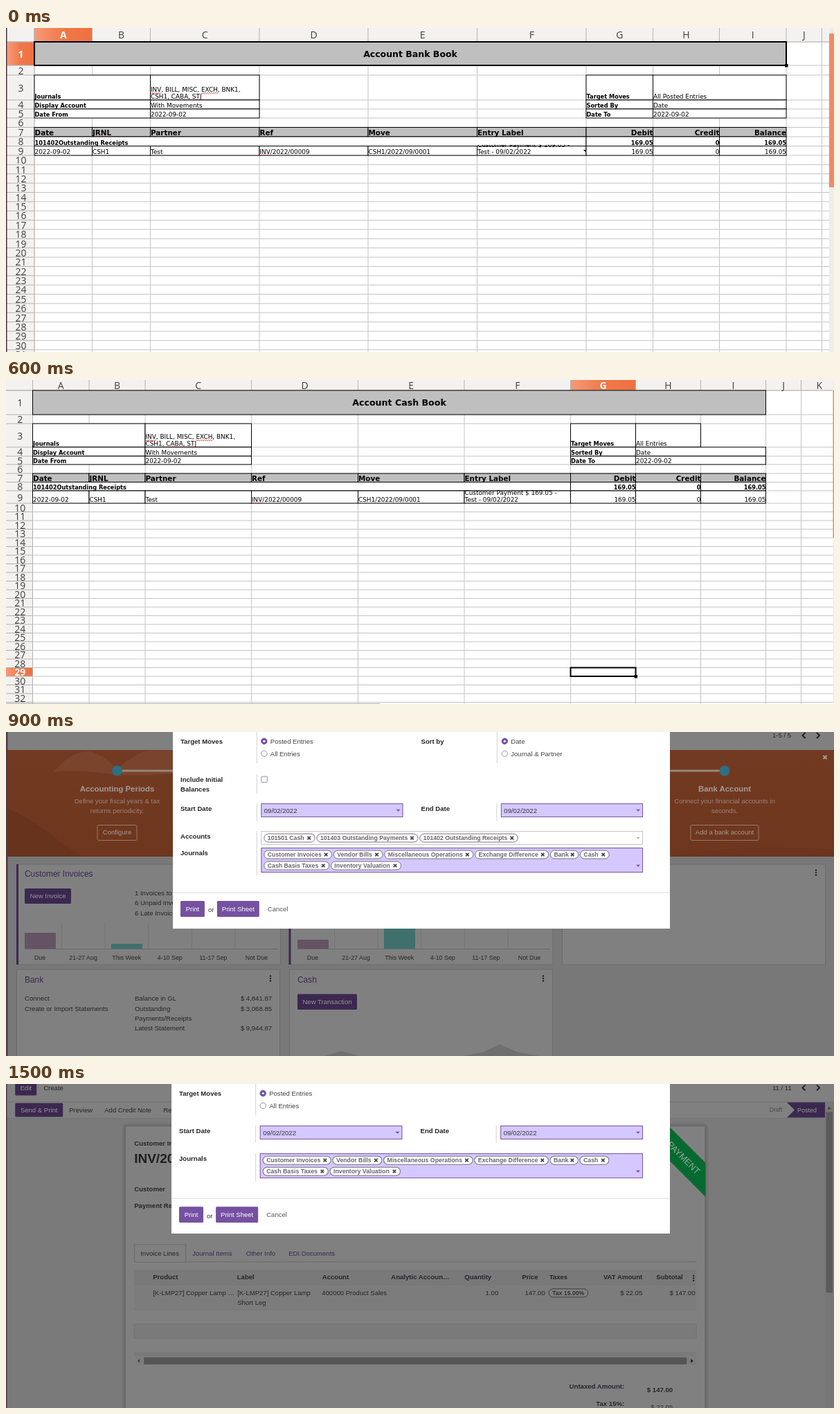
An HTML page for the animation above (1.8 s loop, 1196x468 px).

```html
<!DOCTYPE html>
<html lang="en">
<head>
<meta charset="utf-8">
<title>Accounting reports</title>
<style>
  html, body { margin: 0; width: 100%; height: 100%; overflow: hidden; background: #fff; }
  svg { display: block; }
  #stage { width: 1196px; height: 468px; }
  .scene { visibility: hidden; animation: show 1.8s step-end infinite; animation-delay: calc((var(--i) - 6) * .3s); }
  .sheet { font-family: "DejaVu Sans", sans-serif; }
  .head { font-family: "Open Sans", "Noto Sans", sans-serif; }
  .app { font-family: "Liberation Sans", Arial, sans-serif; }
  @keyframes show { 0% { visibility: visible; } 16.6666%, 100% { visibility: hidden; } }
</style>
</head>
<body>
<svg id="stage" viewBox="0 0 1196 468" xmlns="http://www.w3.org/2000/svg"></svg>
<script>
const PURPLE = '#7551a0', DIM = '#3b2850', INK = '#26262a', PALE = '#949494';
const pen = document.createElement('canvas').getContext('2d');

const rect = (x, y, x2, y2, fill, stroke = 'none', more = '') =>
  `<rect x="${x}" y="${y}" width="${x2 - x}" height="${y2 - y}" fill="${fill}" stroke="${stroke}" ${more}/>`;
const path = (d, stroke, w = 1, fill = 'none') =>
  `<path d="${d}" fill="${fill}" stroke="${stroke}" stroke-width="${w}"/>`;
const shape = (d, fill) => path(d, 'none', 0, fill);
const anchors = { l: 'start', m: 'middle', r: 'end' };

// y is the middle of the capitals
const text = (x, y, s, size = 9.55, fill = '#333', bold = 0, at = 'l') =>
  `<text x="${x}" y="${(y + size * .36).toFixed(2)}" font-size="${size}" fill="${fill}" text-anchor="${anchors[at]}"` +
  `${bold ? ' font-weight="700"' : ''}>${s}</text>`;
const bold = (x, y, s, fill = INK, at = 'l', size = 9.6) => text(x, y, s, size, fill, 1, at);

/* ---------- spreadsheets ---------- */

function squiggles(line, x, y, size, isBold) {
  pen.font = `${isBold ? 'bold ' : ''}${size}px "DejaVu Sans", sans-serif`;
  let out = '';
  for (const m of line.matchAll(/\b(INV|EXCH|CABA|STJ|JRNL)\b/g)) {
    const from = x + pen.measureText(line.slice(0, m.index)).width;
    const n = Math.round(pen.measureText(m[0]).width / 3);
    out += path(`M${from} ${y + 1.2}` + 'l1.5 1.2l1.5 -1.2'.repeat(n), '#e02020', .8);
  }
  return out;
}

function sheet({ xs, rows, step, right, sel, title, titleSize, body, edge = 0, scroll }) {
  const ys = [...rows];
  while (ys.at(-1) < 468) ys.push(ys.at(-1) + step);
  const left = xs[0], top = ys[0];

  const cell = (a, b, r, s = '', o = {}) => {
    const x = xs[a], x2 = xs[b], y = ys[r - 1], y2 = ys[r];
    const size = o.size || (o.bold ? 8.25 : 8.9);
    const lines = s.split('\n');
    const clipY = y - 2, h = y2 - clipY;
    const words = lines.map((line, i) => {
      const base = h - 2 - (lines.length - 1 - i) * 9.7;
      const tx = o.right ? x2 - x : .5;
      return text(tx, base - size * .36, line, size, '#000', o.bold, o.right ? 'r' : 'l') +
        (o.right ? '' : squiggles(line, tx, base, size, o.bold));
    }).join('');
    const mark = o.over ? shape(`M${x2 - 4} ${y2 - 8}h3v3z`, '#000') : '';
    return rect(x, y, x2, y2, o.fill || '#fff', '#000') +
      `<svg x="${x}" y="${clipY}" width="${x2 - x}" height="${h}">${words}</svg>${mark}`;
  };
  const row = (r, vals, o = {}, over) => vals.map((v, i) =>
    cell(i, i + 1, r, v, { ...o, right: i > 5, over: over && i === 5 })).join('');
  const total = (r, label, vals) => cell(0, 6, r, label, { bold: 1 }) +
    vals.map((v, i) => cell(6 + i, 7 + i, r, v, { bold: 1, right: 1 })).join('');
  const info = (r, label, value, c = 0, end = c ? 9 : 3) =>
    cell(c, c ? 7 : 2, r, label, { bold: 1 }) + cell(c ? 7 : 2, end, r, value);
  const titles = r => row(r, ['Date', 'JRNL', 'Partner', 'Ref', 'Move', 'Entry Label', 'Debit', 'Credit', 'Balance'],
    { bold: 1, size: 10.4, fill: '#bfbfbf' });

  let g = rect(0, 0, 1196, 468, '#fff');
  g += path(ys.map(y => `M${left} ${y}H${right}`).join('') + xs.map(x => `M${x} ${top}V468`).join(''), '#c4c4c4');

  let head = rect(0, 0, right, top, '#f4f2f1') + rect(0, 0, left, 468, '#f4f2f1');
  const [c1, c2, sr] = sel;
  head += rect(xs[c1], 0, xs[c1 + 1], top, 'url(#hot)') + rect(edge, ys[sr - 1], left, ys[sr], 'url(#hot)');
  head += path(xs.map(x => `M${x} 0V${top}`).join('') + ys.map(y => `M0 ${y}H${left}`).join('') +
    `M${left} 0V468M0 ${top}H${right}`, '#b5b1ae');
  for (let i = 0; i < xs.length - 1; i++) {
    const on = i === c1;
    head += text((xs[i] + xs[i + 1]) / 2, top / 2 + .3, String.fromCharCode(65 + i), 14, on ? '#fff' : '#3d3d3d', on, 'm');
  }
  for (let r = 1; r < ys.length; r++) {
    const on = r === sr;
    head += text(left / 2 + 1, (ys[r - 1] + ys[r]) / 2 + .5, r, 14, on ? '#fff' : '#3d3d3d', on, 'm');
  }
  g += `<g class="head">${head}</g>`;

  g += rect(left, ys[0], xs[9], ys[1], '#bfbfbf', '#000') +
    text((left + xs[9]) / 2, (ys[0] + ys[1]) / 2, title, titleSize, '#000', 1, 'm');
  g += body({ cell, row, total, info, titles });
  g += rect(xs[c1], ys[sr - 1], xs[c2], ys[sr], 'none', '#000', 'stroke-width="2"') +
    rect(xs[c2] - 2, ys[sr] - 2, xs[c2] + 2.5, ys[sr] + 2.5, '#000');
  g += rect(right, 0, 1196, 468, '#efecea') + rect(right, scroll[0], 1196, scroll[1], '#f08a65');
  return `<g class="sheet">${g}${rect(0, 0, edge, 468, '#45343a')}</g>`;
}

const journals = 'INV, BILL, MISC, EXCH, BNK1,\nCSH1, CABA, STJ';
const day = '2022-09-02', bill = 'INV/2022/00009', move = 'CSH1/2022/09/0001';
const paid = 'Customer Payment $ 169.05 -\nTest - 09/02/2022';

const bookBody = (target, targetEnd, over) => s =>
  s.info(3, 'Journals', journals) + s.info(4, 'Display Account', 'With Movements') + s.info(5, 'Date From', day) +
  s.info(3, 'Target Moves', target, 6, targetEnd) + s.info(4, 'Sorted By', 'Date', 6) + s.info(5, 'Date To', day, 6) +
  s.titles(7) + s.total(8, '101402Outstanding Receipts', ['169.05', '0', '169.05']) +
  s.row(9, [day, 'CSH1', 'Test', bill, move, paid, '169.05', '0', '169.05'], {}, over);

const bankBook = sheet({
  xs: [41, 124.5, 208.5, 366, 523, 680.5, 838, 934.5, 1030.5, 1127, 1178.5],
  rows: [20, 54, 68, 104, 117, 130, 143.5, 157, 170.5, 184], step: 13.37, right: 1189,
  sel: [0, 9, 1], title: 'Account Bank Book', titleSize: 12.5, edge: 1.5, scroll: [8, 230],
  body: bookBody('All Posted Entries', 9, true)
});

const cashBook = sheet({
  xs: [38.5, 120, 201, 354.5, 508.5, 662, 815.5, 909.5, 1003.5, 1097.5, 1148.5, 1201],
  rows: [15, 50, 63, 97, 110, 122, 135, 147.5, 160, 178], step: 12.5, right: 1194.5,
  sel: [6, 7, 29], title: 'Account Cash Book', titleSize: 12.6, scroll: [15, 228],
  body: bookBody('All Entries', 8, false)
}) + rect(0, 467, 540, 468, '#b5b1ae');

const dayBook = sheet({
  xs: [40, 118.5, 196.5, 343, 489, 635.5, 782, 871.5, 961.5, 1051, 1100, 1149.5, 1198],
  rows: [20, 53, 66, 99, 111.5, 124, 136.5, 149, 161.5, 186, 198, 210, 222.5, 235], step: 12.42, right: 1191,
  sel: [1, 2, 29], title: 'Account Day Book', titleSize: 11.5, edge: 1, scroll: [8, 230],
  body: s =>
    s.info(3, 'Journals', journals) + s.info(5, 'Date From', day) +
    s.info(3, 'Target Moves', 'All Posted Entries', 6) + s.info(5, 'Date To', day, 6) +
    s.titles(7) + s.total(8, day, ['338.1', '338.1', '0']) +
    s.row(9, [day, 'INV', 'Test', '', bill, '[K-LMP27] Copper Lamp Short\nLeg', '0', '147', '-147']) +
    s.row(10, [day, 'INV', 'Test', '', bill, 'Tax 15.00%', '0', '22.05', '-22.05']) +
    s.row(11, [day, 'INV', 'Test', '', bill, bill, '169.05', '0', '169.05']) +
    s.row(12, [day, 'CSH1', 'Test', bill, move, paid, '169.05', '0', '169.05'], {}, true) +
    s.row(13, [day, 'CSH1', 'Test', bill, move, paid, '0', '169.05', '-169.05'], {}, true)
});

/* ---------- app screens ---------- */

const button = (x, y, x2, y2, s, fill = DIM, ink = PALE) =>
  rect(x, y, x2, y2, fill, 'none', 'rx="1.5"') + text((x + x2) / 2, (y + y2) / 2, s, 9.55, ink, 0, 'm');
const dots = (x, y) => [-3.5, 0, 3.5].map(d => `<circle cx="${x}" cy="${y + d}" r="1.2" fill="#222"/>`).join('');
const cross = (x, y, r, ink, w) => path(`M${x - r} ${y - r}l${2 * r} ${2 * r}M${x + r} ${y - r}l${-2 * r} ${2 * r}`, ink, w);
const arrows = y => path(`M1154.5 ${y - 4}l-4 4l4 4M1171 ${y - 4}l4 4l-4 4`, '#1c1c1c', 1.8);
const caret = (x, y, ink = PURPLE) => shape(`M${x - 3} ${y - 1.3}h6l-3 3z`, ink);

// Each tag is [label, right edge]
function tags(list, y) {
  let x = 372;
  return list.map(([s, end]) => {
    const g = rect(x, y - 6, end, y + 6, '#fff', '#77727c', 'rx="6"') +
      bold(x + 5, y, s, '#6a6670', 'l', 8.75) + cross(end - 8.5, y, 2.2, '#4a4650', 1.8);
    x = end + 2.7;
    return g;
  }).join('');
}

const radio = (x, y, s, on) =>
  `<circle cx="${x}" cy="${y}" r="4.2" fill="${on ? PURPLE : '#fff'}" stroke="${on ? PURPLE : '#999'}"/>` +
  (on ? `<circle cx="${x}" cy="${y}" r="1.6" fill="#fff"/>` : '') + text(x + 9, y, s, 9.55, '#444');
const rule = (x, y, y2) => path(`M${x} ${y}V${y2}`, '#d2d2d2');

// The dialog keeps its right edge at 959 and zooms a little with its left edge
function modal({ left, y, bottom, account }) {
  const full = !!account, d = full ? 0 : -43.5, j = full ? 0 : -67.5;
  const zoom = (959 - left) / 719;
  const date = (lx, fx, s) => bold(lx, 111 + d, s) + rule(fx - 6.5, 104 + d, 129 + d) +
    rect(fx, 104.5 + d, fx + 204.5, 123.5 + d, '#d5c8ff', PURPLE) +
    text(fx + 4, 114 + d, '09/02/2022') + caret(fx + 198, 114 + d);

  let g = bold(251, 14, 'Target Moves') + rule(361.5, 0, 46) +
    radio(372, 14, 'Posted Entries', 1) + radio(372, 32, 'All Entries');
  if (full) {
    g += bold(599, 14, 'Sort by') + rule(709, 0, 46) + radio(720, 14, 'Date', 1) + radio(720, 32, 'Journal &amp; Partner');
    g += bold(251, 69, 'Include Initial') + bold(251, 83, 'Balances') + rule(361.5, 62, 90) +
      rect(368, 65, 376.5, 73.5, '#fff', '#8d8aa0', 'rx="1"');
    g += bold(251, 151, 'Accounts') + rect(368, 144.5, 919.5, 163.5, '#fff', '#c0c0c0') + caret(913, 154, '#b5b5b5') +
      tags([[account, 445.5], ['101403 Outstanding Payments', 594.5], ['101402 Outstanding Receipts', 739]], 154);
  }
  g += date(251, 368, 'Start Date') + date(599, 715, 'End Date');
  g += bold(251, 175 + j, 'Journals') + rule(361.5, (full ? 144 : 168) + j, 208 + j) +
    rect(368, 168.5 + j, 919.5, 203.5 + j, '#d5c8ff', PURPLE) + caret(913, 194 + j) +
    tags([['Customer Invoices', 470], ['Vendor Bills', 543.5], ['Miscellaneous Operations', 674.5],
      ['Exchange Difference', 783.5], ['Bank', 826.5], ['Cash', 871]], 178 + j) +
    tags([['Cash Basis Taxes', 466], ['Inventory Valuation', 570]], 194 + j);
  g += path(`M240 ${233 + j}H959`, '#dcdcdc') +
    button(251, 245 + j, 286, 268 + j, 'Print', PURPLE, '#fff') + text(291, 258 + j, 'or') +
    button(304, 245 + j, 365, 268 + j, 'Print Sheet', PURPLE, '#fff') + text(377, 256.5 + j, 'Cancel', 9.55, '#555');
  return rect(left, 0, 959, bottom, '#fff') +
    `<g transform="translate(${959 - 959 * zoom} ${y}) scale(${zoom})">${g}</g>`;
}

function invoice(dx, dy) {
  const line = '#696969', item = '[K-LMP27] Copper Lamp';
  let g = button(14, -5, 45, 17, 'Edit') + text(55, 6, 'Create', 9.55, INK);
  g += path('M0 26.5H1196M0 50.5H1183', '#747474');
  g += button(14, 28, 83, 48, 'Send &amp; Print') + text(92, 38, 'Preview', 9.55, INK) +
    text(143, 38, 'Add Credit Note', 9.55, INK) + text(228, 38, 'Reset', 9.55, INK);
  g += [10, 6, 3].map(w => rect(173.5, 62, 1010.5, 480, 'none', '#000', `stroke-width="${w}" opacity=".05" rx="2"`)).join('');
  g += rect(173.5, 61.5, 1010.5, 480, '#808080', '#6b6b6b');
  g += bold(186, 86.5, 'Customer Invoice') + bold(186, 108, 'INV/2022/00009', '#1f1f22', 'l', 19) +
    bold(186, 152, 'Customer') + bold(186, 176.5, 'Payment Reference');

  g += rect(186.5, 232.5, 260.5, 258, '#808080', line) + path('M260 257.5H998', line) + text(195, 245, 'Invoice Lines', 9.55, INK);
  [[270, 'Journal Items'], [347.5, 'Other Info'], [409, 'EDI Documents']].forEach(([x, s]) => g += text(x, 245, s, 9.55, DIM));

  g += rect(186, 269, 998, 290, '#797979') + rect(186, 290, 998, 326, '#7c7c7c') + path('M186 290.5H998M186 326.5H998', '#737373');
  [[213, 'Product'], [334.5, 'Label'], [457.5, 'Account'], [557, 'Analytic Accoun…'], [785.5, 'Taxes']]
    .forEach(([x, s]) => g += bold(x, 279.5, s));
  [[702, 'Quantity'], [769.5, 'Price'], [920, 'VAT Amount'], [978.5, 'Subtotal']]
    .forEach(([x, s]) => g += bold(x, 279.5, s, INK, 'r'));
  g += dots(994, 281);
  [[213, 302, item + ' …'], [335, 302, item], [335, 316, 'Short Leg'], [457, 302, '400000 Product Sales']]
    .forEach(([x, y, s]) => g += text(x, y, s, 9.55, INK));
  [[712, '1.00'], [779.5, '147.00'], [920, '$ 22.05'], [996.5, '$ 147.00']]
    .forEach(([x, s]) => g += text(x, 302, s, 9.55, INK, 0, 'r'));
  g += rect(785, 296.5, 841.5, 308.5, '#808080', '#3b3b3b', 'rx="6"') + bold(813, 302.5, 'Tax 15.00%', '#303034', 'm', 8.7);

  g += rect(186, 347, 998, 368, '#7a7a7a', '#747474') + rect(186, 388, 998, 394, '#797979');
  g += rect(189, 395, 998, 406, '#7c7c7c') + rect(200, 395.5, 984, 405.5, '#555') +
    shape('M194 397.5v6l-3.5 -3z', '#444') + shape('M990 397.5v6l3.5 -3z', '#222');
  g += bold(894, 437, 'Untaxed Amount:', INK, 'r') + bold(964, 442, '$ 147.00', INK, 'r') +
    bold(894, 462, 'Tax 15%:', INK, 'r') + text(964, 467.5, '$ 22.05', 9.55, '#333', 0, 'r');

  const fixed = shape('M908 61L957 61L1010.5 114.5V163.5z', '#066a30') +
    `<g transform="translate(979 107) rotate(45)">${text(0, 0, 'PAYMENT', 13, '#93aa9b', 0, 'm')}</g>` +
    text(1107, 6, '11 / 11', 9.55, INK) + arrows(6) + text(1112, 38, 'Draft', 8.6, '#4b4b4b', 0, 'm') +
    shape('M1128 27H1183V49H1128L1139 38z', DIM) + text(1157, 38, 'Posted', 9, PALE, 0, 'm') +
    rect(1183, 27, 1196, 468, '#777') + shape('M1186 37h6l-3 -4z', '#444') + rect(1184.5, 41, 1194, 302, '#5a5a5a');
  return rect(0, 0, 1196, 468, '#7a7a7a') + rect(0, 0, 1196, 50, '#808080') +
    `<g transform="translate(${dx} ${dy})">${g}</g><g transform="translate(0 ${dy})">${fixed}</g>` +
    rect(0, 0, 1.5, 468, '#503c40');
}

function dashboard() {
  const step = (x, title, a, b, btn, w) =>
    `<circle cx="${x}" cy="56" r="7.5" fill="#2d6f83"/>` + bold(x, 82, title, '#a39a96', 'm', 11.4) +
    text(x, 100, a, 9.55, '#9a8379', 0, 'm') + text(x, 114, b, 9.55, '#9a8379', 0, 'm') +
    rect(x - w / 2, 134.5, x + w / 2, 156.5, 'none', '#94796d', 'rx="2"') + text(x, 145, btn, 9.55, '#a39a96', 0, 'm');
  const card = (x, y, y2, bar) => rect(x + .5, y, x + 380.5, y2, '#808080', '#6c6c6c') + (bar ? rect(x - 1, y, x + 2, y2, DIM) : '');
  const chart = (x, due, week) => {
    let g = rect(x + 11, 313 - due, x + 56, 313, '#645463') + rect(x + 136, 313 - week, x + 181, 313, '#3f706d');
    ['Due', '21-27 Aug', 'This Week', '4-10 Sep', '11-17 Sep', 'Not Due'].forEach((s, i) => {
      const cx = x + 33 + i * 62.6;
      g += text(cx, 326, s, 8.9, INK, 0, 'm') + (i < 5 ? path(`M${cx + 31.5} 276V313`, '#737373') : '');
    });
    return g + path(`M${x + 11} 313.5H${x + 376}`, '#696969');
  };

  let g = rect(0, 0, 1196, 468, '#787878') + rect(0, 0, 1196, 26, '#808080') + text(1107, 5, '1-5 / 5', 9.55, INK) + arrows(5);
  g += rect(0, 26, 1196, 180, 'url(#banner)') +
    shape('M68 58Q95 26 122 28Q146 36 160 54Q190 28 208 26H241V60Q180 66 130 58Q90 54 68 58z', '#7a432b') +
    shape('M2 180V110Q40 126 80 160L110 180z', '#68331d') + shape('M960 180Q1060 160 1196 170V180z', '#6a341e');
  g += path('M161 56H1038', '#94857d', 3) +
    step(160.5, 'Accounting Periods', 'Define your fiscal years &amp; tax', 'returns periodicity.', 'Configure', 57) +
    step(1038, 'Bank Account', 'Connect your financial accounts in', 'seconds.', 'Add a bank account', 98) +
    cross(1183, 36.5, 2.5, '#a39a96', 2);

  g += card(16, 191, 336, 1) + card(409.5, 191, 336, 1) + card(803, 191, 336) + card(15, 343, 480) + card(409, 343, 480);
  g += text(27, 205, 'Customer Invoices', 11.9, DIM) + button(27, 226, 94, 248, 'New Invoice');
  ['1 Invoices to Validate', '6 Unpaid Invoices', '6 Late Invoices'].forEach((s, i) => g += text(186, 232.5 + i * 14.3, s, 9.55, INK));
  g += chart(16, 23, 7) + chart(410, 13, 36) + dots(1170, 203) + dots(382, 356) + dots(776, 356);

  g += text(27, 358, 'Bank', 11.9, DIM) + text(421, 358, 'Cash', 11.9, DIM) + button(421, 378.5, 507, 401, 'New Transaction');
  [[27, 385, 'Connect'], [27, 400, 'Create or Import Statements'], [186, 385, 'Balance in GL'], [186, 400, 'Outstanding'],
    [186, 414, 'Payments/Receipts'], [186, 428, 'Latest Statement']].forEach(([x, y, s]) => g += text(x, y, s, 9.55, INK));
  [[385, '$ 4,841.87'], [400, '$ 3,068.85'], [428, '$ 9,944.87']].forEach(([y, s]) => g += text(384, y, s, 9.55, INK, 0, 'r'));
  g += shape('M460 468L485 461L510 468zM660 468L690 462L713 451L738 462L770 468z', '#6f6f6f');
  return g + rect(0, 0, 2.5, 468, '#503c40');
}

const app = s => `<g class="app">${s}</g>`;
const scenes = [
  bankBook,
  app(invoice(0, 0) + modal({ left: 240, y: 0, bottom: 285, account: '101404 Bank' })),
  cashBook,
  app(dashboard() + modal({ left: 241, y: -.7, bottom: 284, account: '101501 Cash' })),
  dayBook,
  app(invoice(-.8, -.6) + modal({ left: 239, y: -.5, bottom: 216 }))
];

document.getElementById('stage').innerHTML =
  `<defs>
    <linearGradient id="hot"><stop offset="0" stop-color="#f79a78"/><stop offset=".5" stop-color="#f1784a"/><stop offset="1" stop-color="#ef7040"/></linearGradient>
    <linearGradient id="banner" x2="0" y2="1"><stop offset="0" stop-color="#733a22"/><stop offset="1" stop-color="#6f361e"/></linearGradient>
  </defs>` +
  scenes.map((s, i) => `<g class="scene" style="--i:${i}">${s}</g>`).join('');
</script>
</body>
</html>
```
